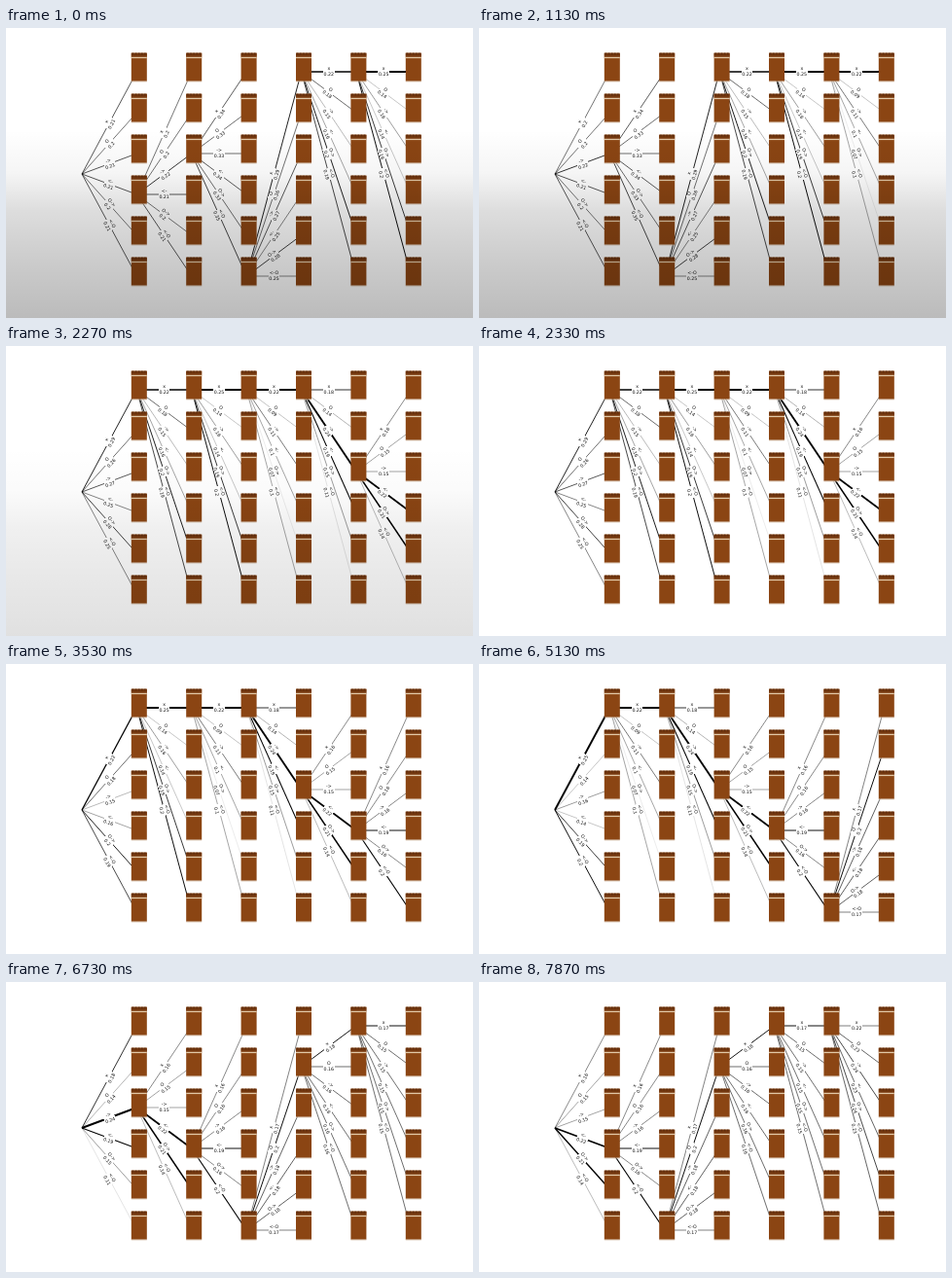
These frames come from a looping animation (480 px wide and 298 px high, 8 s). An HTML page with a canvas:

```html
<!DOCTYPE html>
<html lang="en">
<head>
<meta charset="utf-8">
<style>
  html, body { margin: 0; width: 100%; height: 100%; overflow: hidden; background: #fff; }
  #shade, canvas { position: absolute; left: 0; top: 0; width: 480px; height: 298px; }
  #shade { background: linear-gradient(#0000 35%, #0000000a 50%, #0002 63%, #0003 80%, #0004); }
</style>
</head>
<body>
<canvas id="stage" width="480" height="298"></canvas>
<div id="shade"></div>
<script>
const LOOP = 8000;
const ROWS = 6, COLS = 6;
const ACTIONS = ['x', 'O', '->', '<-', 'O->', '<-O'];

// The row chosen at each step and its score in hundredths.
const CHOSEN = [3, 2, 5, 0, 0, 0, 0, 2, 3, 5, 1, 0, 0, 2];
const BEST = [21, 22, 35, 29, 22, 25, 22, 24, 22, 20, 20, 18, 17, 24];

const ctx = document.getElementById('stage').getContext('2d');
const shade = document.getElementById('shade');

const nodeX = col => 134.4 + 56.4 * col;
const nodeY = row => 45 + 42 * row;

function random(step, row) {
  const n = Math.sin(step * 12.9898 + row * 78.233) * 43758.5453;
  return n - Math.floor(n);
}

// The other actions fall below the best one, most widely around the middle steps.
function scoreOf(step, row) {
  if (row === CHOSEN[step]) return BEST[step];
  const spread = 2 + 13 * Math.exp(-(((step - 6.3) / 2.4) ** 2));
  return BEST[step] - Math.round(spread * Math.sqrt(random(step, row)));
}

function fillRect(color, x, y, w, h) {
  ctx.fillStyle = color;
  ctx.fillRect(x, y, w, h);
}

function drawEdge({ x1, y1, x2, y2, share }) {
  ctx.lineWidth = Math.min(1.9, 1.9 * (share / 0.22) ** 4);
  ctx.beginPath();
  ctx.moveTo(x1, y1);
  ctx.lineTo(x2, y2);
  ctx.stroke();
}

function drawLabel({ x1, y1, x2, y2, score, row }) {
  ctx.save();
  ctx.translate((x1 + x2) / 2, (y1 + y2) / 2);
  ctx.rotate(Math.atan2(y2 - y1, x2 - x1));
  ctx.clearRect(-5.8, -5, 11.6, 10);
  ctx.fillText(ACTIONS[row], 0, -2.9);
  ctx.fillText(String(score / 100), 0, 3.1);
  ctx.restore();
}

function drawNode(col, row) {
  const x = nodeX(col) - 5.6, y = nodeY(row) - 19.3;
  fillRect('#8b4513', x, y, 16, 29);
  fillRect('#74380f', x, y, 16, 4);
  for (let i = 0; i < 5; i++) fillRect('#5a2a0e', x + 1 + i * 3.1, y, 1.4, 1.6);
  fillRect('#e2c8a6', x, y + 4.1, 16, 1.3);
  fillRect('#d8c4b0', x, y + 29, 16, 0.7);
}

function drawTree(shift) {
  const edges = [];
  for (let col = 0; col < COLS; col++) {
    const step = shift + col;
    const scores = ACTIONS.map((_, row) => scoreOf(step, row));
    const total = scores.reduce((a, b) => a + b);
    const parent = col ? CHOSEN[step - 1] : 2.5;
    scores.forEach((score, row) => edges.push({
      x1: nodeX(col - 1), y1: nodeY(parent),
      x2: nodeX(col), y2: nodeY(row),
      score, row, share: score / total
    }));
  }
  ctx.strokeStyle = '#000';
  edges.forEach(drawEdge);
  ctx.fillStyle = '#111';
  ctx.font = '4.7px "DejaVu Sans", sans-serif';
  ctx.textAlign = 'center';
  ctx.textBaseline = 'middle';
  edges.forEach(drawLabel);
  for (let col = 0; col < COLS; col++)
    for (let row = 0; row < ROWS; row++) drawNode(col, row);
}

function frame(now) {
  const t = now % LOOP;
  shade.style.opacity = Math.max(0, Math.min(1, (2330 - t) / 130));
  ctx.clearRect(0, 0, 480, 298);
  drawTree(Math.floor((t + 800) / 1000));
  requestAnimationFrame(frame);
}
requestAnimationFrame(frame);
</script>
</body>
</html>
```
